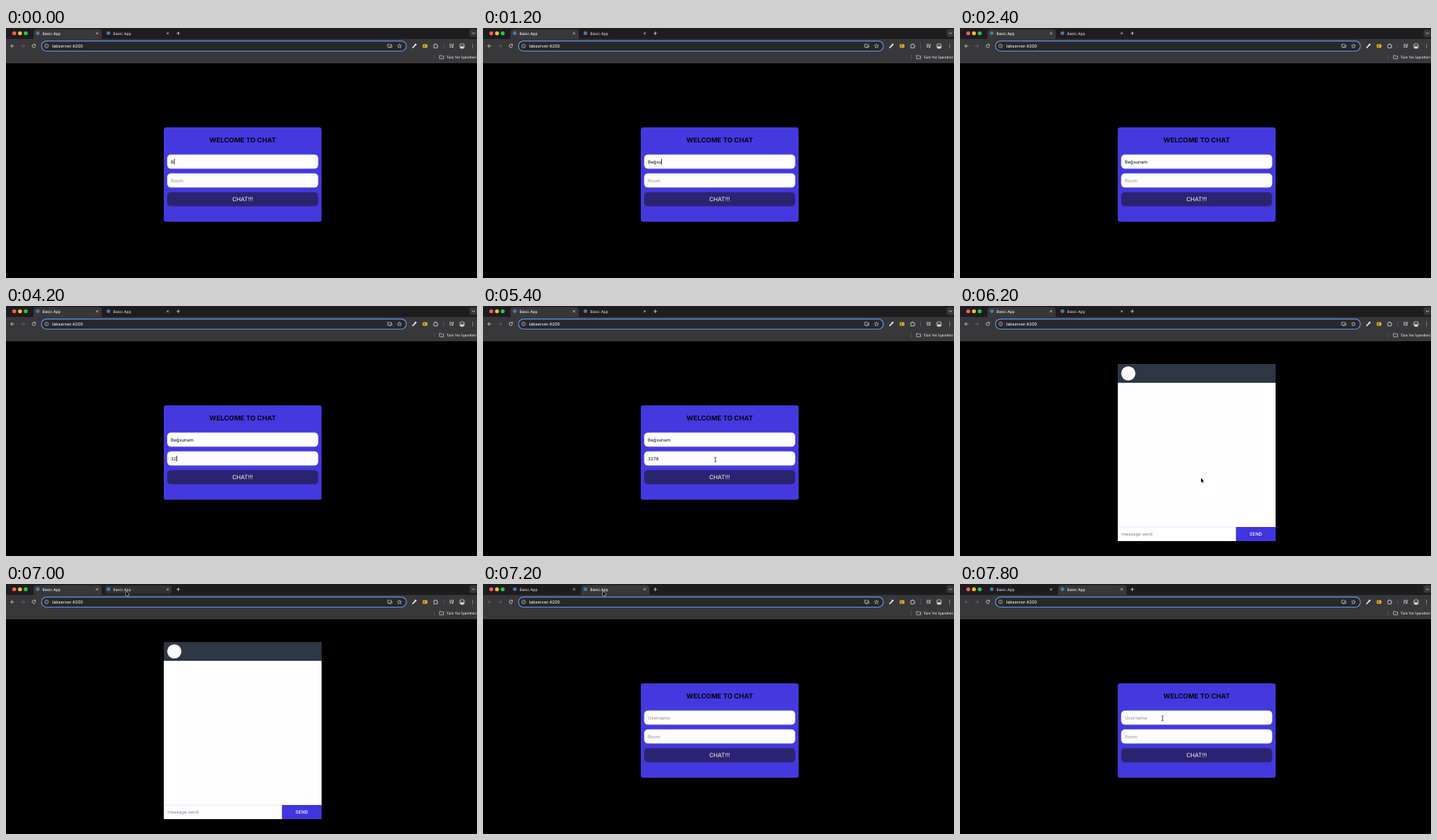
An HTML page with a canvas that plays this animation: 600x319 px, repeating every 8000 ms.

```html
<!DOCTYPE html>
<html lang="en">
<head>
<meta charset="utf-8">
<title>Chat demo</title>
<style>
  html, body { margin: 0; width: 100%; height: 100%; overflow: hidden; background: #000; }
  canvas { display: block; width: 600px; height: 319px; }
</style>
</head>
<body>
<canvas id="stage" width="600" height="319"></canvas>
<script>
const ctx = document.getElementById('stage').getContext('2d');
const LOOP = 8000, STEP = 200;
const USER = 'Beğsunam', ROOM = '3278', HOST = 'labserver:4200', TAB = 'Basic App';
const CHAT_OPENS = 6200, TAB_SWITCH = 7200, ROOM_FOCUS = 3000;
const userKeys = [0, 600, 800, 1000, 1200, 1400, 1600, 1800];
const roomKeys = [4000, 4200, 4600, 4800];
const BAR = '#38373a', INDIGO = '#4439de', ICON = '#d4d3d6', DIM = '#68676a';

// Pointer route: time, x, y
const route = [
  [5400, 296, 196], [5800, 307, 219], [6000, 307, 220], [6600, 307, 220],
  [6800, 222, 105], [7000, 153, 10], [7200, 153, 10], [7400, 214, 92],
  [7600, 269, 162], [7800, 258, 171.3]
];

function pointerAt(t) {
  if (t < route[0][0]) return null;
  const i = route.findIndex(p => p[0] >= t);
  if (i < 1) return { x: route[0][1], y: route[0][2] };
  const [a, b] = [route[i - 1], route[i]];
  const k = (t - a[0]) / (b[0] - a[0]);
  return { x: a[1] + (b[1] - a[1]) * k, y: a[2] + (b[2] - a[2]) * k };
}

const inside = (p, x, y, w, h) => !!p && p.x >= x && p.x <= x + w && p.y >= y && p.y <= y + h;

function box(x, y, w, h, fill, r = 0) {
  ctx.fillStyle = fill;
  ctx.beginPath();
  ctx.roundRect(x, y, w, h, r);
  ctx.fill();
}

function dot(x, y, r, fill) {
  ctx.fillStyle = fill;
  ctx.beginPath();
  ctx.arc(x, y, r, 0, Math.PI * 2);
  ctx.fill();
}

function stroke(d, color, width = 0.8, x = 0, y = 0) {
  ctx.save();
  ctx.translate(x, y);
  ctx.strokeStyle = color;
  ctx.lineWidth = width;
  ctx.stroke(new Path2D(d));
  ctx.restore();
}

function text(str, x, y, size, color, weight = 400, align = 'left') {
  ctx.font = `${weight} ${size}px Inter, Roboto, sans-serif`;
  ctx.fillStyle = color;
  ctx.textAlign = align;
  ctx.fillText(str, x, y);
  return ctx.measureText(str).width;
}

function tab(x, active, hover) {
  if (active) {
    box(x, 1.5, 87, 14, BAR, [4, 4, 0, 0]);
  } else if (hover) {
    box(x + 1, 2, 85, 10.5, '#323134', 3);
  }
  dot(x + 5.5, 6.7, 2.4, '#4a7ba6');
  text(TAB, x + 11.5, 8.5, 4.8, active ? '#f0eff1' : '#d2d1d4', 500);
  stroke('M-1.4-1.4L1.4 1.4M1.4-1.4L-1.4 1.4', ICON, 0.7, x + 81, 6.8);
}

function browser(second, pointer) {
  box(0, 0, 600, 15, '#1e1c1e');
  box(0, 14, 600, 31, BAR);
  ['#ff5f57', '#febc2e', '#28c840'].forEach((c, i) => dot(10.5 + i * 7.3, 6.7, 2.5, c));
  tab(35, !second, false);
  tab(125, second, inside(pointer, 125, 1, 87, 13));
  stroke('M-2.2 0H2.2M0-2.2V2.2', ICON, 0.8, 219.5, 6.8);
  box(590.5, 1.5, 9.5, 10, '#38373a', 3);
  stroke('M-1.8-.9L0 .9L1.8-.9', ICON, 0.9, 595.5, 6.7);

  stroke('M2.3 0H-2.2M0-2.2L-2.2 0L0 2.2', second ? DIM : ICON, 0.8, 8.2, 22.9);
  stroke('M-2.3 0H2.2M0-2.2L2.2 0L0 2.2', DIM, 0.8, 21.7, 22.9);
  stroke('M1.8-1.2A2.1 2.1 0 1 0 2 .7M2.1-2.5V-.8H.4', ICON, 0.8, 35.5, 22.9);

  box(45, 16.5, 465, 13, '#282729', 6.5);
  ctx.strokeStyle = '#5b8fdd';
  ctx.lineWidth = 1.2;
  ctx.beginPath();
  ctx.roundRect(45.2, 16.6, 464.8, 12.9, 6.4);
  ctx.stroke();
  stroke('M2.4 0A2.4 2.4 0 1 1-2.4 0A2.4 2.4 0 1 1 2.4 0M0-.3V1.4M0-1.5V-.8', ICON, 0.6, 51.7, 22.9);
  text(HOST, 59, 24.9, 5.3, '#eeedf0', 500);

  stroke('M.4-2H-2.8V1.5H2.8V.3M-1.2 2.4H1.2M1.7-2.4V.2M.6-.8L1.7.3L2.8-.8', ICON, 0.7, 489, 22.8);
  stroke('M0-2.7L.8-.8L2.7-.8L1.2.5L1.7 2.4L0 1.3L-1.7 2.4L-1.2.5L-2.7-.8L-.8-.8Z', ICON, 0.6, 501.3, 23);
  stroke('M-2.2 2.4L1.8-1.8', '#f4f4f4', 1.5, 520, 23);
  dot(521.8, 21.1, 1.2, '#f4f4f4');
  box(530.8, 20.8, 6, 4.5, '#e0a82e', 0.7);
  box(532, 22.2, 2, 1.5, '#6b5220');
  stroke('M-2.3-1.6H-.9V-2.5H.6V-1.6H2V0H2.8V1.2H2V2.5H-2.3Z', ICON, 0.8, 547.3, 22.9);
  box(557.3, 19.5, 0.7, 7, '#5b5a5e');
  stroke('M-2.8-1.7H1M-2.8 0H.2M-2.8 1.7H-.8M1.7 1.6V-1.8H3', ICON, 0.8, 567.7, 22.7);
  dot(568.7, 24.3, 0.9, ICON);
  dot(581, 23, 3.7, '#8d8885');
  dot(581, 22, 1.4, '#3b3533');
  box(578.7, 23.5, 4.6, 2.5, '#e0dcda', [2, 2, 1, 1]);
  [-2, 0, 2].forEach(d => dot(594.6, 23 + d, 0.55, ICON));

  box(545, 34, 0.7, 6.5, '#5b5a5e');
  stroke('M-2.6-2H-.7L0-1.2H2.7V2.2H-2.6Z', ICON, 0.7, 554.8, 37);
  text('Tüm Yer İşaretleri', 560.7, 38.8, 4.6, '#e2e1e4', 500);
}

function field(y, value, hint, caret) {
  box(205.3, y, 192.4, 18.2, '#fdfcff', 5);
  if (!value) text(hint, 210, y + 11.3, 5.85, '#8f8f98');
  const w = value ? text(value, 210, y + 11.3, 5.75, '#111') : 0;
  if (caret) box(210.2 + w, y + 5.6, 0.7, 7.2, '#000');
}

const typed = (word, keys, t) => word.slice(0, keys.filter(k => k <= t).length);

function caretOn(keys, t) {
  const last = Math.max(...keys.filter(k => k <= t));
  return Math.floor((t - last) / 500) % 2 === 0;
}

function login(t, second, pointer) {
  const inRoom = t >= ROOM_FOCUS;
  const hover = inside(pointer, 205, 209, 193, 19);
  box(201, 126.7, 201, 120.5, INDIGO, 3);
  text('WELCOME TO CHAT', 301.5, 146.4, 8.55, '#050410', 700, 'center');
  field(161.4, second ? '' : typed(USER, userKeys, t), 'Username',
    !second && !inRoom && caretOn(userKeys, t));
  field(185.4, second ? '' : typed(ROOM, roomKeys, t), 'Room',
    !second && inRoom && caretOn([ROOM_FOCUS, ...roomKeys], t));
  box(205.3, 209.4, 192.4, 18.2, hover ? '#352c95' : '#2a2470', 5);
  text('CHAT!!!', 301.4, 220.8, 7.4, hover ? '#cbc9ea' : '#fff', 400, 'center');
}

function chat() {
  box(201, 74, 201, 226, '#fefdff');
  box(201, 74, 201, 24, '#2d3746');
  dot(214.4, 86, 9.1, '#fdfdff');
  box(201, 281.7, 150.5, 0.7, '#e3e3e8');
  text('message send', 206, 293.3, 5.7, '#80858f');
  box(351.5, 282, 50.5, 18, '#4035df');
  text('SEND', 376.8, 293.2, 5.85, '#fff', 500, 'center');
}

function shape(d, fill, edge) {
  const path = new Path2D(d);
  ctx.lineWidth = 0.9;
  ctx.strokeStyle = edge;
  ctx.stroke(path);
  ctx.fillStyle = fill;
  ctx.fill(path);
}

function drawPointer(p, kind) {
  ctx.save();
  ctx.translate(p.x, p.y);
  if (kind === 'beam') {
    stroke('M-1.4-3H-.5L0-2.5L.5-3H1.4M0-2.5V2.5M-1.4 3H-.5L0 2.5L.5 3H1.4', '#222', 0.8);
  } else if (kind === 'hand') {
    shape('M0 0Q.8-.7 1.2.3L1.6 2L3.4 2.6Q4 3 3.7 4.2L3.2 6H.7L-1.2 3.6Q-.9 2.8.4 3.6Z', '#fff', '#111');
  } else {
    shape('M0-.5V5L1.3 3.9L2.2 5.8L3.1 5.4L2.2 3.5H3.9Z', '#000', '#fff');
  }
  ctx.restore();
}

function draw(t) {
  const second = t >= TAB_SWITCH;
  const inChat = t >= CHAT_OPENS && !second;
  const pointer = pointerAt(t);
  ctx.textRendering = 'geometricPrecision';
  box(0, 0, 600, 319, '#000');
  browser(second, pointer);
  if (inChat) chat();
  else login(t, second, pointer);
  if (!pointer) return;
  const overField = [161.4, 185.4].some(y => inside(pointer, 205, y, 193, 18.2));
  const overButton = inside(pointer, 205, 209, 193, 19);
  drawPointer(pointer, inChat ? 'arrow' : overField ? 'beam' : overButton ? 'hand' : 'arrow');
}

const start = performance.now();
function tick() {
  const t = (performance.now() - start) % LOOP;
  draw(Math.floor(t / STEP) * STEP);
  requestAnimationFrame(tick);
}
tick();
</script>
</body>
</html>
```
